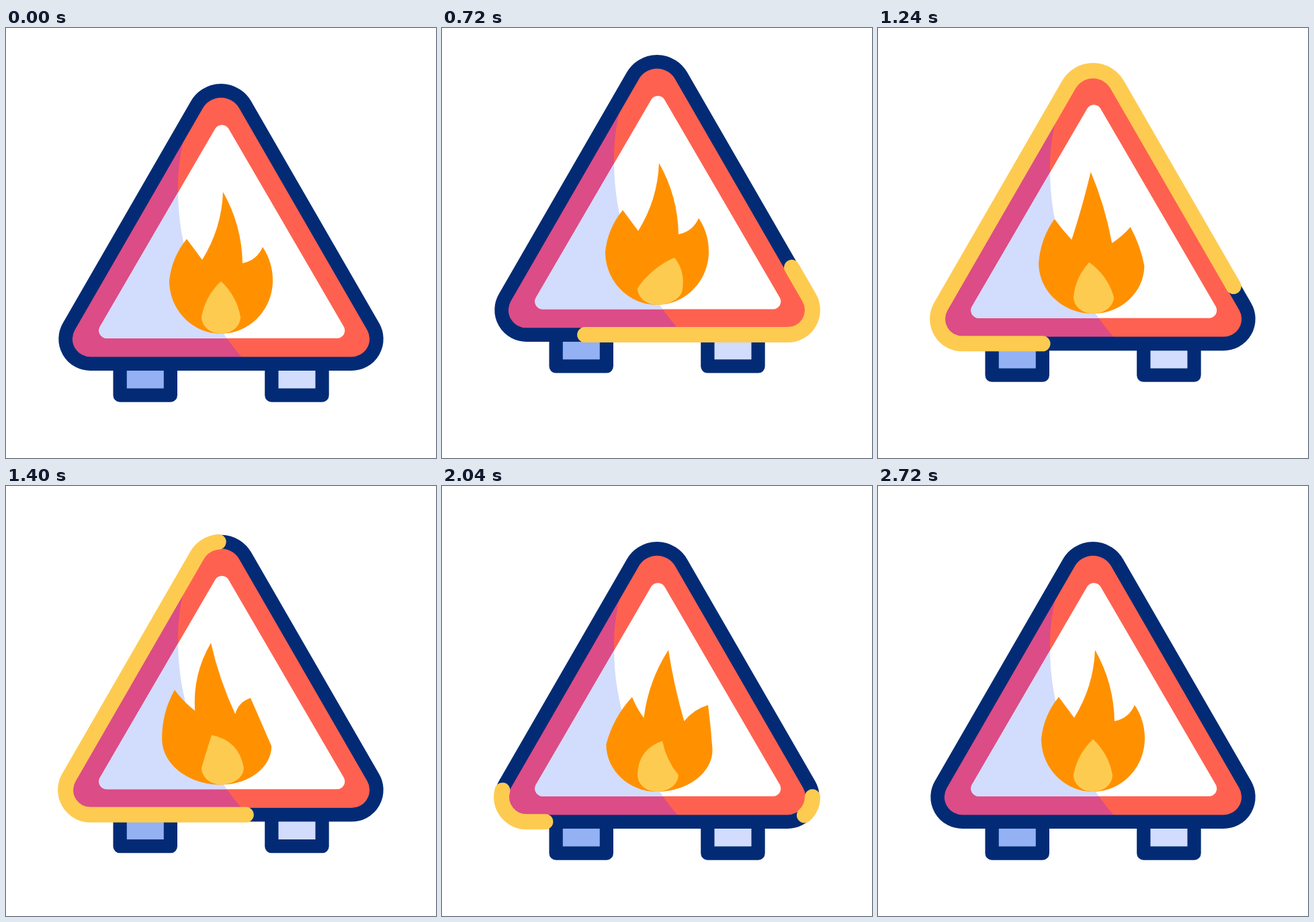
An HTML page with a canvas that plays this animation: 640 px wide and 640 px high, repeating every 2800 ms.

```html
<!DOCTYPE html>
<html lang="en">
<head>
<meta charset="utf-8">
<title>Fire warning sign</title>
<style>
  html, body { margin: 0; width: 100%; height: 100%; overflow: hidden; background: #fff; }
  canvas { display: block; width: 640px; height: 640px; }
</style>
</head>
<body>
<canvas id="stage" width="640" height="640"></canvas>
<script>
const ctx = document.getElementById('stage').getContext('2d');
const LOOP = 2800, STEP = 40;
const NAVY = '#032b75', RED = '#ff6150', PINK = '#dc4c86', PALE = '#d2dcfd',
      BLUE = '#93b1f3', ORANGE = '#ff9100', YELLOW = '#fecb51';

const clamp = v => Math.min(1, Math.max(0, v));
const lerp = (a, b, k) => a + (b - a) * k;

// Timing curve like cubic-bezier(x1, 0, x2, 1).
function ease(x1, x2, u) {
  u = clamp(u);
  let lo = 0, hi = 1;
  for (let i = 0; i < 24; i++) {
    const s = (lo + hi) / 2, r = 1 - s;
    if (3 * x1 * s * r * r + 3 * x2 * s * s * r + s * s * s < u) lo = s;
    else hi = s;
  }
  return lo * lo * (3 - 2 * lo);
}

// Rounded triangle: left and right x, base y, top y, base and top radius.
function triangle(l, r, base, top, rb, rt) {
  const mid = (l + r) / 2, p = new Path2D();
  p.moveTo(l + rb * Math.sqrt(3), base);
  p.arcTo(r, base, mid, top, rb);
  p.arcTo(mid, top, l, base, rt);
  p.arcTo(l, base, r, base, rb);
  p.closePath();
  return p;
}

const SIDE = 516.8, RB = 36.9, RT = 41.5;
const PERIMETER = 3 * SIDE - (2 * RB + RT) * 2 * (Math.sqrt(3) - Math.PI / 3);
const frame = triangle(320 - SIDE / 2, 320 + SIDE / 2, 499.7, 51.8, RB, RT);
const panel = triangle(129.8, 512.8, 461.7, 132.8, 11.5, 11.5);
const shade = new Path2D('M60 140H272C260 180 256 205 256 240C256 340 292 420 350 489L360 501H60Z');

function fill(path, color) {
  ctx.fillStyle = color;
  ctx.fill(path);
}

function shaded(path, color, shadeColor) {
  fill(path, color);
  ctx.save();
  ctx.clip(path);
  fill(shade, shadeColor);
  ctx.restore();
}

function leg(x, color) {
  const p = new Path2D();
  p.roundRect(x, 490, 95.5, 66.7, 10);
  fill(p, NAVY);
  ctx.fillStyle = color;
  ctx.fillRect(x + 20.3, 500, 55, 36.4);
}

// Points run from the left edge over the tips to the right edge;
// each bend pushes the middle of one edge outwards. The bottom is round.
function blaze(points, bends, color) {
  const mid = 320, base = 455, k = 0.55, p = new Path2D();
  const [lx, ly] = points[0], [rx, ry] = points[points.length - 1];
  p.moveTo(lx, ly);
  bends.forEach((bend, i) => {
    const [ax, ay] = points[i], [bx, by] = points[i + 1];
    const push = bend / Math.hypot(bx - ax, by - ay);
    p.quadraticCurveTo((ax + bx) / 2 + (by - ay) * push,
                       (ay + by) / 2 - (bx - ax) * push, bx, by);
  });
  p.bezierCurveTo(rx, lerp(ry, base, k), lerp(mid, rx, k), base, mid, base);
  p.bezierCurveTo(lerp(mid, lx, k), base, lx, lerp(ly, base, k), lx, ly);
  fill(p, color);
}

function flame(sway) {
  const size = Math.abs(sway), bent = clamp(size / 16);
  const tip = (x, y) => [x + sway, y];
  const notch = (x, y) => [x + sway * 0.6, y];
  const points = [
    [243 + sway * 0.35 - size * 0.25, 376 + size * 0.6],
    tip(269, 314), notch(292, 345), tip(323, 244), notch(352, 350), tip(382, 326),
    [397 + sway * 0.25 + size * 0.15, 376 + size * 1.2]
  ];
  const bends = [[10, 10], [0, -3], [-14, 16], [14, -6], [-10, 9], [8, 0]];
  blaze(points, bends.map(([calm, wild]) => lerp(calm, wild, bent)), ORANGE);
}

function core(lean, curl) {
  const size = Math.abs(lean);
  const points = [[291, 430], [320 + lean, 377 + size * 0.3], [349 + size * 0.35, 430]];
  blaze(points, [10 + curl * 12, 10 - curl * 17], YELLOW);
}

// Time, flame sway, core lean, core curl.
const POSES = [
  [120, 0, 0, 0], [360, -11, -1, 0], [720, 0, 26, 0], [1040, 10, 6, 1],
  [1400, -18, -14, -0.8], [2040, 14, 8, 1], [2720, 0, 0, 0]
];

function poseAt(t) {
  const next = Math.max(1, POSES.findIndex(p => t < p[0]));
  if (t >= 2720) return [0, 0, 0];
  const [t0, ...a] = POSES[next - 1], [t1, ...b] = POSES[next];
  const u = ease(1 / 3, 2 / 3, (t - t0) / (t1 - t0));
  return a.map((v, i) => lerp(v, b[i], u));
}

const lift = t => -44 * (ease(0.5, 0.5, (t - 120) / 680) - ease(0.5, 0.5, (t - 965) / 675));

// A lap of the frame whose tail follows its head, while the whole lap drifts on.
const LAP = 1571, LAG = 603, DRIFT = 0.2725;
const TRAILS = [
  { start: 136, end: 2320, origin: -72 },
  { start: 1700, end: 2440, origin: -160.5 }
];

function trail({ start, end, origin }, t) {
  const age = t - start;
  const lap = ms => PERIMETER * ease(0.575, 0.262, ms / LAP);
  const tail = lap(age - LAG), length = lap(age) - tail;
  if (t >= end || length < 1) return;
  ctx.setLineDash([length, PERIMETER - length]);
  ctx.lineDashOffset = -(origin + DRIFT * age + tail);
  ctx.strokeStyle = YELLOW;
  ctx.lineWidth = 23;
  ctx.lineCap = 'round';
  ctx.stroke(frame);
  ctx.setLineDash([]);
}

function draw(t) {
  const [sway, lean, curl] = poseAt(t);
  ctx.fillStyle = '#fff';
  ctx.fillRect(0, 0, 640, 640);
  ctx.save();
  ctx.translate(0, lift(t));

  leg(159.5, BLUE);
  leg(385.2, PALE);
  shaded(frame, RED, PINK);
  shaded(panel, '#fff', PALE);
  ctx.strokeStyle = NAVY;
  ctx.lineWidth = 20.6;
  ctx.stroke(frame);

  flame(sway);
  core(lean, curl);
  TRAILS.forEach(item => trail(item, t));
  ctx.restore();
}

const began = performance.now();
function tick() {
  const t = (performance.now() - began) % LOOP;
  draw(Math.floor(t / STEP) * STEP);
  requestAnimationFrame(tick);
}
tick();
</script>
</body>
</html>
```
